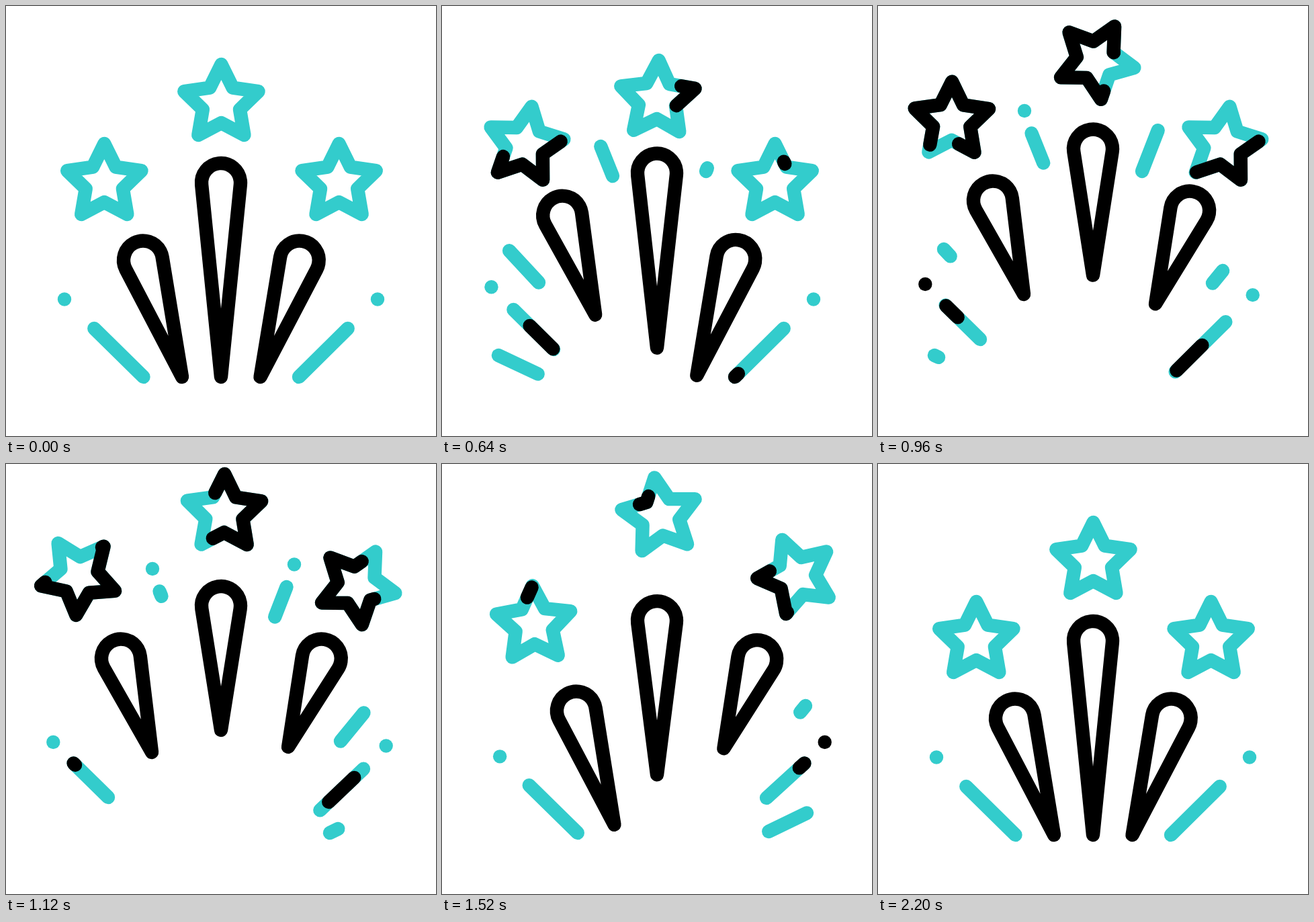
Write an HTML page with a canvas that moves like this. It is 640 px wide and 640 px high and loops after 2400 ms.

```html
<!DOCTYPE html>
<html lang="en">
<head>
<meta charset="utf-8">
<title>Fireworks</title>
<style>
  html, body { margin: 0; width: 100%; height: 100%; overflow: hidden; background: #fff; }
  canvas { display: block; width: 640px; height: 640px; }
</style>
</head>
<body>
<canvas id="stage" width="640" height="640"></canvas>
<script>
const LOOP = 2400, STEP = 40, CYAN = '#33cccc', BLACK = '#000', WIDTH = 20.4;
const ctx = document.getElementById('stage').getContext('2d');

const lerp = (a, b, p) => a + (b - a) * p;
const mix = (a, b, p) => [lerp(a[0], b[0], p), lerp(a[1], b[1], p)];
const shift = (a, d, p) => [a[0] + d[0] * p, a[1] + d[1] * p];

// cubic-bezier(x1, 0, x2, 1) over a time span; the default is smoothstep.
function ease(t, [from, to], [x1, x2] = [1 / 3, 2 / 3]) {
  const x = (t - from) / (to - from);
  if (x <= 0) return 0;
  if (x >= 1) return 1;
  let lo = 0, hi = 1;
  for (let i = 0; i < 24; i++) {
    const s = (lo + hi) / 2, r = 1 - s;
    if (3 * x1 * s * r * r + 3 * x2 * s * s * r + s * s * s < x) lo = s; else hi = s;
  }
  return lo * lo * (3 - 2 * lo);
}

const upDown = (t, up, down) => ease(t, up) - ease(t, down);

function stroke(points, color, closed) {
  ctx.beginPath();
  points.forEach(p => ctx.lineTo(...p));
  if (closed) ctx.closePath();
  ctx.strokeStyle = color;
  ctx.stroke();
}

function dot([x, y], color) {
  ctx.beginPath();
  ctx.arc(x, y, WIDTH / 2, 0, 7);
  ctx.fillStyle = color;
  ctx.fill();
}

function trimmed(a, b, from, to, color) {
  if (from < to) stroke([mix(a, b, from), mix(a, b, to)], color);
}

// Each star rises and spins two fifths of a turn, one after another.
const RISE = [400, 1160], RISE_CURVE = [.25, .15];
const SPIN = [320, 1730], SPIN_CURVE = [.625, .25], SPIN_ANGLE = Math.PI * .8;
const ERASE_CURVE = [.55, .2];
const stars = [
  { at: [146.3, 263], move: [-38, -96], delay: 0, fall: [1250, 1650],
    ink: [220, 1120], erase: [740, 1780] },
  { at: [320.4, 145], move: [4.7, -75], delay: 160, fall: [1438, 1848],
    ink: [477, 1141], erase: [720, 1820] },
  { at: [495.6, 263], move: [31.5, -96], delay: 320, fall: [1545, 1945],
    ink: [590, 1470], erase: [1126, 1906] }
];

function drawStar(t, star) {
  const local = t - star.delay;
  const lift = ease(local, RISE, RISE_CURVE) * (1 - ease(t, star.fall));
  const [x, y] = shift(star.at, star.move, lift);
  const turn = SPIN_ANGLE * ease(local, SPIN, SPIN_CURVE);
  const corner = i => {
    const r = i % 2 ? 29 : 58, a = turn + i * Math.PI / 5;
    return [x + r * Math.sin(a), y - r * Math.cos(a)];
  };
  const along = u => mix(corner(Math.floor(u)), corner(Math.floor(u) + 1), u % 1);
  stroke(Array.from({ length: 10 }, (_, i) => corner(i)), CYAN, true);

  // A black run drifts along the ten edges while it grows and shrinks.
  const drift = Math.max(0, .0043 * (local - 140));
  const from = drift + 10 * ease(t, star.erase, ERASE_CURVE);
  const to = drift + 10 * ease(t, star.ink);
  if (from >= to) return;
  const run = [along(from)];
  for (let i = Math.floor(from) + 1; i < to; i++) run.push(corner(i));
  run.push(along(to));
  stroke(run, BLACK);
}

const rockets = [
  { head: [204, 378.5], tip: [262, 552], headMove: [-33, -89], tipMove: [-45, -123],
    up: [313, 798], down: [1203, 1609] },
  { head: [320, 263], tip: [320, 552], headMove: [0, -52], tipMove: [0, -156],
    up: [438, 1020], down: [1250, 1850] },
  { head: [436.7, 378.5], tip: [378.6, 552], headMove: [33, -89], tipMove: [41.5, -131],
    up: [602, 1087], down: [1488, 1904] }
];

// A round head joined to the tip by its two tangents.
function drawRocket(t, rocket) {
  const p = upDown(t, rocket.up, rocket.down), r = 29;
  const [hx, hy] = shift(rocket.head, rocket.headMove, p);
  const [qx, qy] = shift(rocket.tip, rocket.tipMove, p);
  const toTip = Math.atan2(qy - hy, qx - hx);
  const half = Math.acos(r / Math.hypot(qx - hx, qy - hy));
  ctx.beginPath();
  ctx.moveTo(qx, qy);
  ctx.arc(hx, hy, r, toTip + half, toTip - half + 2 * Math.PI);
  ctx.closePath();
  ctx.strokeStyle = BLACK;
  ctx.stroke();
}

// The right side follows the left one, mirrored.
const SIDE_DELAY = 500;
const sides = [
  { flip: 1, delay: 0, dot: [87, 436.5], top: [131.3, 480], low: [204.5, 552],
    lowMove: [-52.5, -56], ink: [150, 1020], erase: [600, 1200] },
  { flip: -1, delay: SIDE_DELAY, dot: [553, 436.5], top: [508.7, 480], low: [436, 552],
    lowMove: [47, -55], ink: [500, 1382], erase: [883, 1710] }
];

function drawSide(t, side) {
  const local = t - side.delay;
  const fall = ease(local, [1126, 1583]);
  const p = ease(local, [290, 775]) - fall;
  const top = shift(side.top, [-30.7 * side.flip, -34.5], p);
  const low = shift(side.low, side.lowMove, ease(local, [360, 784]) - fall);
  stroke([low, top], CYAN);
  trimmed(low, top, ease(t, side.erase), ease(t, side.ink), BLACK);
  const dark = local >= 840 && local < 1120;
  dot(shift(side.dot, [-16.7 * side.flip, -22.5], p), dark ? BLACK : CYAN);
}

// Sparks shoot from a to b, then vanish from a.
const sparks = [
  { a: [143.5, 548], b: [84, 520], grow: [150, 600], trim: [610, 1047] },
  { a: [144, 411.5], b: [98, 362], grow: [196, 706], trim: [638, 1095] },
  { a: [254, 253], b: [228.5, 189.5], grow: [400, 780], trim: [820, 1200] },
  { a: [393, 246], b: [417.5, 183], grow: [565, 1010], trim: [980, 1370] },
  { a: [498, 412.5], b: [541, 360], grow: [756, 1266], trim: [1198, 1640] },
  { a: [482, 549], b: [543, 519.5], grow: [990, 1440], trim: [1450, 1887] }
];
const flashes = [
  { at: [218, 156], on: 780, off: 1360 },
  { at: [429, 149.5], on: 1040, off: 1440 }
];

function draw(t) {
  ctx.fillStyle = '#fff';
  ctx.fillRect(0, 0, 640, 640);
  ctx.lineWidth = WIDTH;
  ctx.lineCap = ctx.lineJoin = 'round';
  sparks.forEach(s => trimmed(s.a, s.b, ease(t, s.trim), ease(t, s.grow), CYAN));
  flashes.forEach(f => { if (t >= f.on && t < f.off) dot(f.at, CYAN); });
  sides.forEach(s => drawSide(t, s));
  rockets.forEach(r => drawRocket(t, r));
  stars.forEach(s => drawStar(t, s));
}

const start = performance.now();
function frame() {
  const t = (performance.now() - start) % LOOP;
  draw(Math.floor(t / STEP) * STEP);
  requestAnimationFrame(frame);
}
frame();
</script>
</body>
</html>
```
